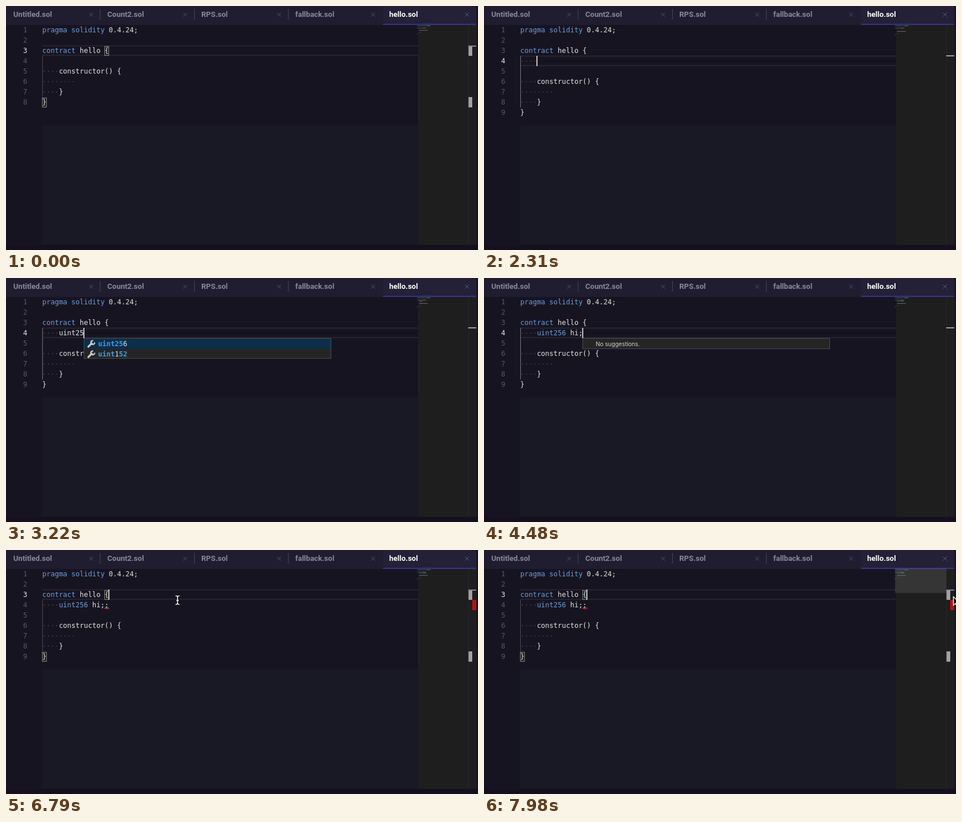
These frames come from a looping animation (820x426 px, 8000 ms). An HTML page:

```html
<!DOCTYPE html>
<html lang="en">
<head>
<meta charset="utf-8">
<title>Code editor</title>
<style>
  html, body { margin: 0; width: 100%; height: 100%; overflow: hidden; background: #171422; }
  svg { display: block; width: 820px; height: 426px; }
  text { white-space: pre; }
  .code { font: 12px "DejaVu Sans Mono", monospace; fill: #e4e4e4; }
  .key { fill: #6a9fd8; }
  .num { fill: #d9e3d2; }
  .dot { fill: #45424f; }
  .gutter { fill: #595666; text-anchor: end; }
  .now { fill: #e6e6e6; }
  .hit { fill: #3c9ee6; font-weight: bold; }
  .tab { font: 700 13px Roboto, sans-serif; fill: #8b889a; }
  .note { font: 10px Inter, sans-serif; fill: #d2d2d2; }
</style>
</head>
<body>
<svg viewBox="0 0 820 426">
  <rect width="820" height="426" fill="#171422"/>
  <rect x="63" y="208" width="653" height="209" fill="#191825"/>
  <rect y="417" width="820" height="9" fill="#141020"/>
  <rect x="716" y="33" width="101" height="384" fill="#1e1e1e"/>
  <path d="M803.5 33V417" stroke="#28282a"/>
  <g id="tabs"></g>
  <g id="stage"></g>
</svg>
<script>
const LOOP = 8000, LEFT = 63, TOP = 33, ROW = 18, CHAR = 7.2245;
const ENTER = 2100, ERROR = 5530, CLICK = 6580;
const stage = document.getElementById("stage");

const typing = [
  [2100, ""], [2520, "u"], [2660, "ui"], [2730, "uin"], [2870, "uint"],
  [3010, "uint2"], [3150, "uint25"], [3360, "uint256"], [3570, "uint256 "],
  [3850, "uint256 h"], [3990, "uint256 hi"], [4270, "uint256 hi;"], [4970, "uint256 hi;;"]
];
const mouse = [
  [350, 620, 330], [630, 483, 129], [1000, 483, 129], [1440, 298, 87],
  [5950, 298, 87], [6250, 318, 100], [6520, 298, 87], [6860, 298, 87],
  [7560, 690, 108], [7840, 815, 81]
];

const colX = c => LEFT + CHAR * c;
const rowY = n => TOP + ROW * (n - 1);
const text = (x, y, s, cls) => `<text x="${x.toFixed(2)}" y="${y}" class="${cls}">${s}</text>`;
const rect = (x, y, w, h, fill, more = "") =>
  `<rect x="${x}" y="${y}" width="${w}" height="${h}" fill="${fill}" ${more}/>`;
const path = (d, stroke, w = 1, more = "") =>
  `<path d="${d}" fill="none" stroke="${stroke}" stroke-width="${w}" ${more}/>`;

function drawTabs() {
  let out = rect(0, 0, 817, 33, "#211d31") + rect(655, 0, 162, 33, "#232038") + rect(655, 31, 162, 2, "#35358c");
  ["Untitled", "Count2", "RPS", "fallback", "hello"].forEach((name, i) => {
    const x = 163.25 * i, active = i === 4;
    out += text(x + 12.8, 19, name + ".sol", active ? "tab\" style=\"fill:#fff" : "tab");
    out += path(`M${x + 144.5} 11.5l7 7m0-7l-7 7`, active ? "#5c5975" : "#514e63");
    if (i && !active) out += path(`M${Math.round(x) + .5} 5V24`, "#464358");
  });
  document.getElementById("tabs").innerHTML = out;
}

// Each line is a list of [column, text, class].
function getLines(t, typed) {
  const dots = n => [0, "·".repeat(n), "dot"];
  const lines = [
    [[0, "pragma solidity", "key"], [16, "0.4.24", "num"], [22, ";", ""]],
    [],
    [[0, "contract", "key"], [9, "hello {", ""]],
    [],
    [dots(4), [4, "constructor() {", ""]],
    [dots(8)],
    [dots(4), [4, "}", ""]],
    [[0, "}", ""]]
  ];
  if (t >= ENTER) {
    const type = (typed.match(/^uint(256)?(?!\d)/) || [""])[0];
    lines.splice(3, 0, [dots(4), [4, type, "key"], [4 + type.length, typed.slice(type.length), ""]]);
  }
  return lines;
}

function drawLines(lines, current) {
  let out = "";
  lines.forEach((line, i) => {
    const y = rowY(i + 1) + 13;
    out += text(37, y, i + 1, "code gutter" + (i + 1 === current ? " now" : ""));
    for (const [c, s, cls] of line) {
      out += text(colX(c), y, s, "code " + cls);
      if (cls !== "dot")
        out += path(`M${714 + c} ${34.5 + 2 * i}h${s.length}`, cls === "key" ? "#6a9fd8" : "#ddd", 1,
          `stroke-dasharray="1.6 .5" opacity=".5"`);
    }
  });
  return out;
}

function suggestions(typed) {
  const digits = [...typed.slice(4)];
  const all = Array.from({ length: 32 }, (_, i) => "uint" + 8 * (i + 1)).sort();
  const rank = s => s.startsWith(typed) ? 0 : 1;
  return ["uint", ...all]
    .filter(s => digits.every(d => s.includes(d)))
    .sort((a, b) => rank(a) - rank(b)).slice(0, 12);
}

function drawList(x, y, typed) {
  const items = suggestions(typed);
  const isHit = (ch, i) => i < 4 ? i < typed.length : typed.slice(4).includes(ch);
  let out = rect(x + .5, y + .5, 429, items.length * ROW - 1, "#252526", `stroke="#4a4a4a"`) +
    rect(x + 1, y + 1, 428, ROW, "#0d2e49");
  items.forEach((item, i) => {
    const spans = [...item].map((ch, k) => isHit(ch, k) ? `<tspan class="hit">${ch}</tspan>` : ch).join("");
    out += `<g transform="translate(${x + 13} ${y + 10 + ROW * i})">` +
      path("M-5 5L1-1", "#c8c8c8", 3.2, `stroke-linecap="round"`) +
      path("M3.5-5.5a3.3 3.3 0 1 0 2.5 3", "#c8c8c8", 2.4) + "</g>" +
      text(x + 25, y + 14 + ROW * i, spans, "code");
  });
  return out;
}

function drawPopup(t, x, y, typed) {
  if (t >= 2590 && t < 3570 && typed) return drawList(x, y, typed);
  if (t >= 4340 && t < 4690)
    return rect(x + .5, y + .5, 429, 18, "#252526", `stroke="#4a4a4a"`) + text(x + 23, y + 14, "No suggestions.", "note");
  return "";
}

function mouseAt(t) {
  let i = mouse.findIndex(k => k[0] > t);
  if (i < 0) return mouse[mouse.length - 1].slice(1);
  const [t0, x0, y0] = mouse[Math.max(i - 1, 0)], [t1, x1, y1] = mouse[i];
  const p = Math.min(1, Math.max(0, (t - t0) / (t1 - t0))), e = p * p * (3 - 2 * p);
  return [x0 + (x1 - x0) * e, y0 + (y1 - y0) * e];
}

function drawMouse(t, [x, y]) {
  const arrow = t < 1130 || x > 714;
  const shape = arrow
    ? `<path d="M.5.5V15.5L4 12.3 6.6 18 9.2 16.8 6.7 11.3H11.3Z" fill="#0c0a12" stroke="#fff" stroke-width="1.3"/>`
    : ["#000", "#fff"].map((c, i) =>
        path("M-3.5-7Q0-7 0-5Q0-7 3.5-7M0-5V6M-3.5 8Q0 8 0 6Q0 8 3.5 8M-2 1H2", c, i ? 1.6 : 3)).join("");
  return `<g transform="translate(${x.toFixed(1)} ${y.toFixed(1)})">${shape}</g>`;
}

function draw(t) {
  const done = typing.filter(k => k[0] <= t);
  const [keyTime, typed] = done[done.length - 1] || [0, ""];
  const inside = t >= ENTER && t < CLICK;
  const current = inside ? 4 : 3, col = inside ? 4 + typed.length : 16;
  const lines = getLines(t, typed), last = lines.length;
  const y = rowY(current), x = colX(col);
  const pos = mouseAt(t), shown = t >= 350 && t < ENTER || t >= 5950;

  let out = path(`M63 ${y + .5}H716M63 ${y + 17}H716`, "#2c2a33", 1.4);
  out += path(`M63.5 ${rowY(4)}V${rowY(last)}`, inside ? "#77767c" : "#4b4953");
  if (!inside)
    for (const [c, n] of [[15, 3], [0, last]])
      out += rect(colX(c) + .2, rowY(n) + 1.5, 7, 16, "#192019", `stroke="#8c8c8c"`) +
        rect(803.5, rowY(n), 6.5, ROW, "#a2a2a2");
  out += drawLines(lines, current);
  out += rect(803, y - (inside ? 1 : 0), 14, 2, inside ? "#a2a2a2" : "#85858a");
  if (t >= ERROR)
    out += rect(810, rowY(4), 7, ROW, "#b31212") +
      path(`M${colX(15)} 102.5l2-2 2 2.5 2-2.5 2 2.5`, "#e03a3a", 1.2);

  const start = t >= CLICK ? CLICK : t >= ENTER ? keyTime : t >= 1470 ? 1470 : -550;
  if ((t - start) % 1000 < 500) out += rect(x - .7, y, 1.6, ROW, "#f0f0f0");
  if (shown && pos[0] > 714) out += rect(714, 32, 89, 43, "#797979", `opacity=".25"`);
  if (inside) out += drawPopup(t, Math.round(x), y + ROW, typed);
  if (shown) out += drawMouse(t, pos);
  return out;
}

let previous = "";
function frame() {
  const next = draw(performance.now() % LOOP);
  if (next !== previous) stage.innerHTML = previous = next;
  requestAnimationFrame(frame);
}
drawTabs();
frame();
</script>
</body>
</html>
```
